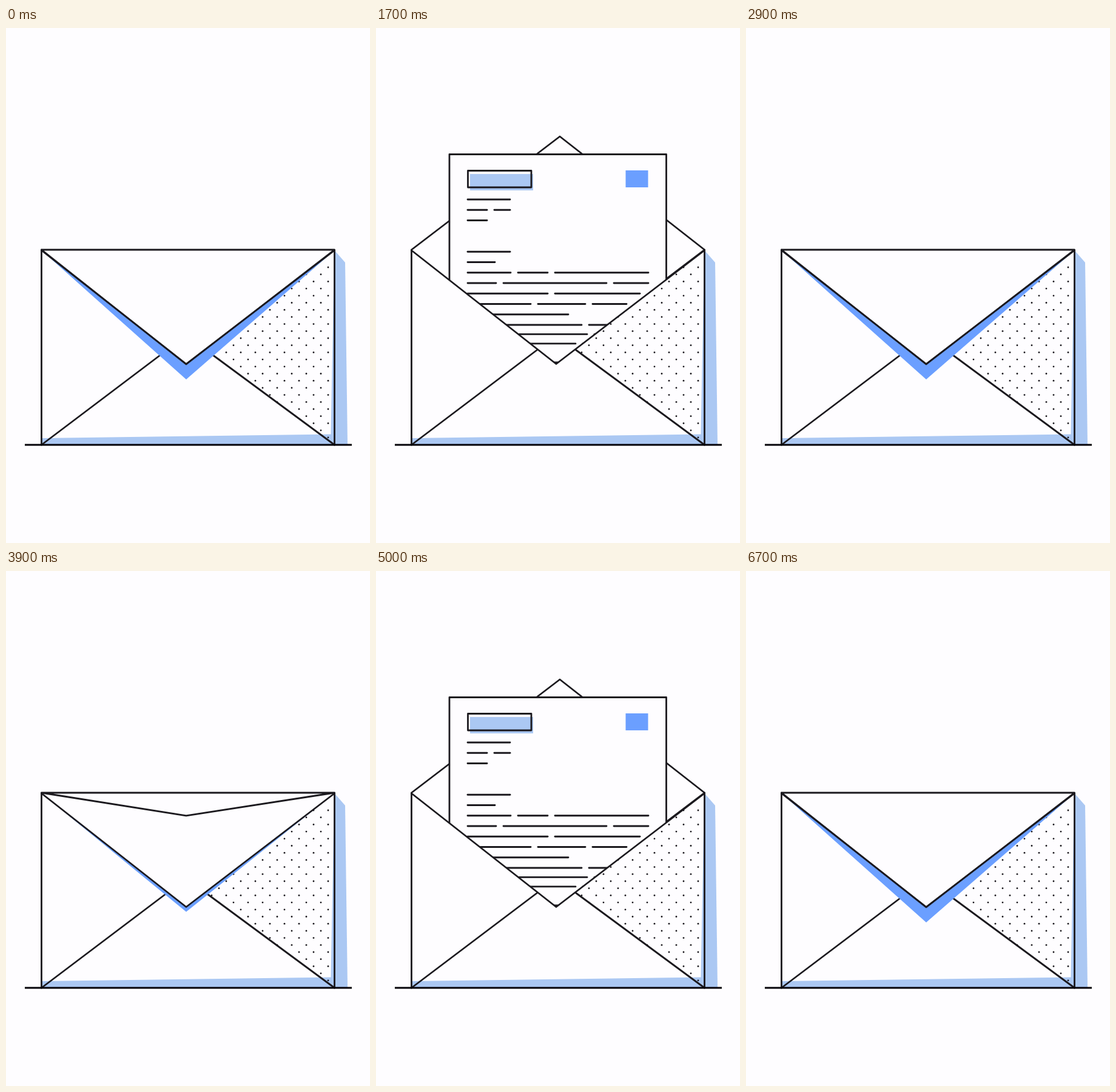
Recreate the animation shown at these times as an HTML page with a canvas. Size 600 by 850 pixels, loop 7700 ms.

```html
<!DOCTYPE html>
<html lang="en">
<head>
<meta charset="utf-8">
<title>Envelope</title>
<style>
html, body { margin: 0; width: 100%; height: 100%; overflow: hidden; background: #fefdff; }
canvas { display: block; }
</style>
</head>
<body>
<canvas id="stage" width="600" height="850"></canvas>
<script>
const ctx = document.getElementById('stage').getContext('2d');
const LOOP = 7700, STEP = 100;
const PAPER = '#fefdff', INK = '#1b191e', PALE = '#abc8f3', BLUE = '#6b9fff';
const LEFT = 58.5, RIGHT = 541.5, TOP = 367, BASE = 688, MID = 297;
const HINGE = TOP - 1, FLAP_UP = 179, FLAP_DOWN = 555;
const MARGIN = 151, ROW = 17.25, GAP = 12;

// The envelope opens over a span of time and closes again later
const cycles = [
  { open: 0, span: 1100, close: 1900 },
  { open: 3490, span: 1460, close: 5800 }
];

const inOut = p => p < 0.5 ? 4 * p ** 3 : 1 - 4 * (1 - p) ** 3;
const out = p => 1 - (1 - p) ** 3;

function poseAt(time) {
  const pose = { letter: 562, flap: FLAP_DOWN, shade: 580 };
  const move = (part, start, end, to, ease = inOut) => {
    const p = Math.min(1, Math.max(0, (time - start) / (end - start)));
    pose[part] += (to - pose[part]) * ease(p);
  };
  for (const { open, span, close } of cycles) {
    const at = part => open + span * part;
    move('shade', open, at(0.485), FLAP_DOWN);
    move('flap', at(0.156), at(0.4245), FLAP_UP);
    move('letter', at(0.486), at(0.727), 198);
    move('letter', at(0.727), at(1), 208, out);
    move('letter', close, close + 800, 562);
    move('flap', close + 225, close + 825, FLAP_DOWN);
    move('shade', close + 300, close + 900, 580);
  }
  return pose;
}

// Rows of writing: right end, then the middle of each gap between words
const rows = [
  [221], [221, 189], [183], [], [], [221], [196],
  [449, 228, 289], [449, 204, 386], [435, 289], [413, 261, 351],
  [317], [449, 345], [449, 354], [449, 335], [], [449, 288]
];

function trace(points, close) {
  ctx.beginPath();
  for (const [x, y] of points) ctx.lineTo(x, y);
  if (close) ctx.closePath();
}

function fill(color, ...points) {
  trace(points, true);
  ctx.fillStyle = color;
  ctx.fill();
}

function line(...points) {
  trace(points);
  ctx.stroke();
}

function box(color, x, y, w, h) {
  ctx.fillStyle = color;
  ctx.fillRect(x, y, w, h);
}

function clipped(points, paint) {
  ctx.save();
  trace(points, true);
  ctx.clip();
  paint();
  ctx.restore();
}

function drawWriting(top) {
  rows.forEach(([end, ...gaps], i) => {
    const y = top + 75 + i * ROW - Math.max(0, i - 12) * 1.8;
    let x = MARGIN;
    for (const gap of gaps) {
      line([x, y], [gap - GAP / 2, y]);
      x = gap + GAP / 2;
    }
    if (end) line([x, y], [end, y]);
  });
}

function drawLetter(top) {
  box(PAPER, 121, top, 358, 400);
  ctx.strokeRect(121, top + 0.5, 357.5, 400);
  box(PALE, 155, top + 33, 104, 27);
  ctx.strokeRect(MARGIN + 0.5, top + 27.5, 104.5, 27.5);
  box(BLUE, 411.5, top + 27, 37, 28);
  drawWriting(top);
}

function drawDots() {
  ctx.fillStyle = INK;
  for (let col = 0; col < 17; col++) {
    for (let y = 395 + (col % 2) * 11.7; y < BASE; y += 23.4) {
      ctx.beginPath();
      ctx.arc(531 - col * 12, y, 1.4, 0, Math.PI * 2);
      ctx.fill();
    }
  }
}

function draw(time) {
  const pose = poseAt(time);
  const open = pose.flap < HINGE;
  const lift = Math.max(0, (HINGE - pose.flap) / (HINGE - FLAP_UP));
  const flap = [[LEFT, HINGE], [MID + 6 * lift, pose.flap], [RIGHT, HINGE]];
  const pocket = [[LEFT, TOP], [MID, 554.5], [RIGHT, TOP]];

  box(PAPER, 0, 0, 600, 850);
  ctx.strokeStyle = INK;
  ctx.lineWidth = 2.8;
  ctx.lineCap = ctx.lineJoin = 'round';

  fill(PALE, [RIGHT, TOP], [559, 387], [563, BASE], [RIGHT, BASE]);
  fill(PALE, [LEFT, 677], [535.5, 670.5], [540.5, 400], [RIGHT, 400], [RIGHT, BASE], [LEFT, BASE]);

  if (open) line(...flap);
  clipped([...pocket, [RIGHT, 0], [LEFT, 0]], () => drawLetter(pose.letter));

  clipped([[RIGHT, TOP], [329, 531], [RIGHT, BASE]], drawDots);
  line([LEFT, BASE], [266, 531]);
  line([329, 531], [RIGHT, BASE]);

  if (pose.shade > FLAP_DOWN + 1) fill(BLUE, pocket[0], [MID, pose.shade], pocket[2], pocket[1]);
  if (open) {
    line([480, 412.8], [RIGHT, HINGE]);
  } else {
    fill(PAPER, ...flap);
    line(...flap, flap[0]);
  }
  line(...pocket);
  line([LEFT, TOP], [LEFT, BASE]);
  line([RIGHT, TOP], [RIGHT, BASE]);

  ctx.strokeStyle = '#050308';
  ctx.lineCap = 'butt';
  line([31, BASE], [570, BASE]);
}

const start = performance.now();
function tick() {
  const time = (performance.now() - start) % LOOP;
  draw(Math.floor(time / STEP) * STEP);
  requestAnimationFrame(tick);
}
tick();
</script>
</body>
</html>
```
